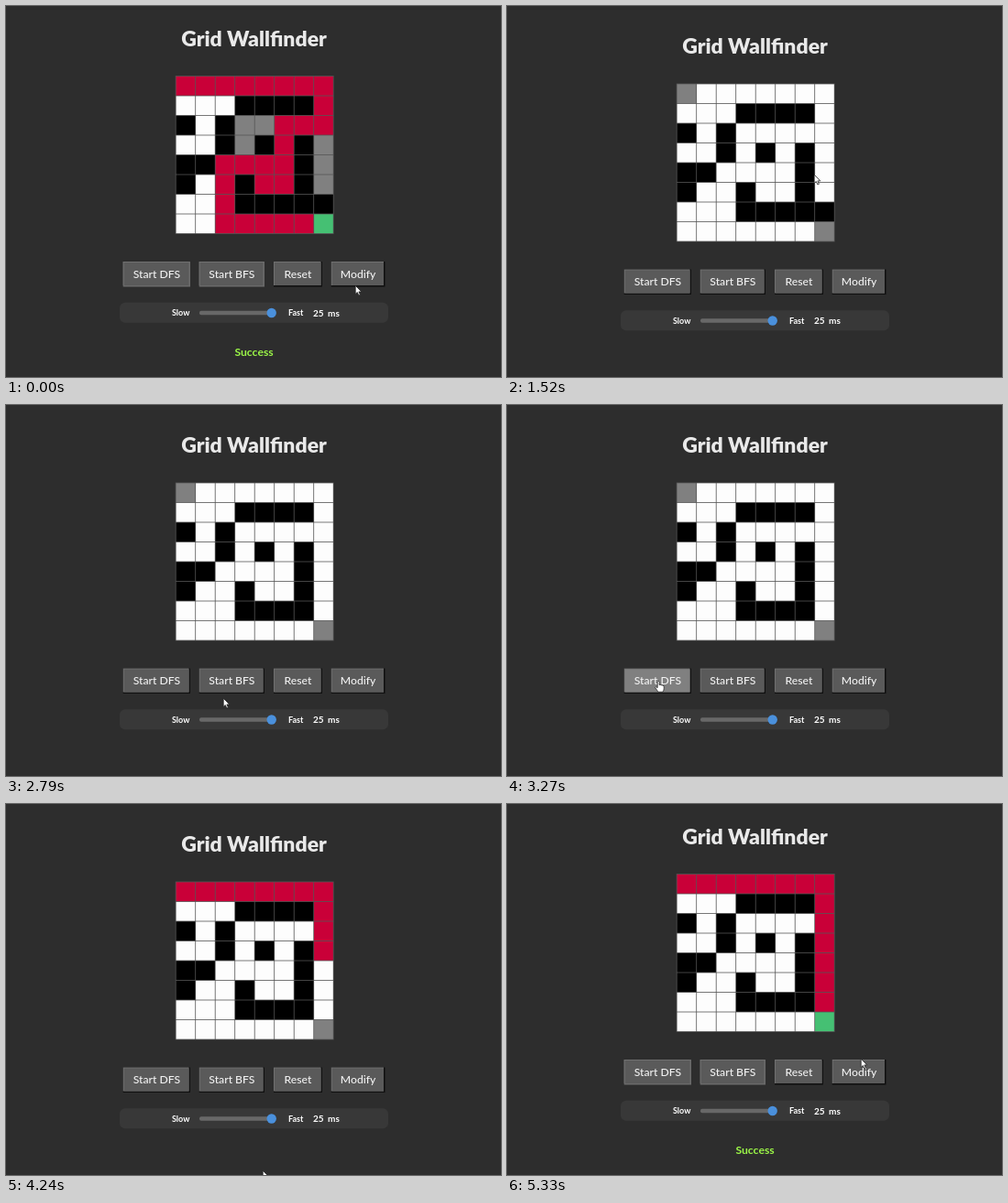
These frames come from a looping animation (540x405 px, 5.36 s). An HTML page with a canvas:

```html
<!DOCTYPE html>
<html lang="en">
<head>
<meta charset="utf-8">
<title>Grid Wallfinder</title>
<style>
  html, body { margin: 0; width: 100%; height: 100%; overflow: hidden; background: #2d2d2d; }
  canvas { display: block; width: 540px; height: 405px; }
</style>
</head>
<body>
<canvas id="stage" width="540" height="405"></canvas>
<script>
const ctx = document.getElementById('stage').getContext('2d');
const LOOP = 5360;
const CLEAR = 580, TOGGLE = 1950, SEARCH = 3376, STEP = 82;
const DONE = SEARCH + 14 * STEP;
const GRID = { x: 185.2, y: 85, size: 21.5, n: 8, line: 0.8 };

const COLORS = {
  '.': '#fdfdfd', '#': '#000', r: '#c90038', g: '#808080', e: '#45c073'
};

const MAZE = [
  'g.......',
  '...####.',
  '#.#.....',
  '..#.#.#.',
  '##....#.',
  '#..#..#.',
  '...#####',
  '.......g'
];

const SOLVED = [
  'rrrrrrrr',
  '...####r',
  '#.#ggrrr',
  '..#g#r#g',
  '##rrrr#g',
  '#.r#rr#g',
  '..r#####',
  '..rrrrre'
];

const BUTTONS = [
  { label: 'Start DFS', x: 127.7, w: 73.3, search: true },
  { label: 'Start BFS', x: 210.7, w: 71.3, search: true },
  { label: 'Reset', x: 292, w: 53 },
  { label: 'Modify', x: 354.7, w: 58.8 }
];
const BUTTON_Y = 287.5, BUTTON_H = 27.5;

// Pointer path: time, x, y
const PATH = [
  [0, 382, 306], [30, 382, 306], [180, 391, 293], [800, 391, 293],
  [1180, 362, 238], [1520, 336, 185], [1820, 346, 224], [2100, 346, 226],
  [2790, 238, 321], [3080, 166, 302], [3360, 166, 302], [3580, 242, 400],
  [3680, 254, 412], [4120, 278, 412], [4240, 281, 401], [4360, 288, 412],
  [4930, 374, 412], [5180, 388, 300], [5330, 387, 279], [LOOP, 387, 279]
];

function pointerAt(t) {
  let i = 0;
  while (i < PATH.length - 2 && t >= PATH[i + 1][0]) i++;
  const [t0, x0, y0] = PATH[i], [t1, x1, y1] = PATH[i + 1];
  const p = Math.min(1, (t - t0) / (t1 - t0));
  const k = p * p * (3 - 2 * p);
  return { x: x0 + (x1 - x0) * k, y: y0 + (y1 - y0) * k };
}

function cellAt(t, row, col) {
  if (t < CLEAR) return SOLVED[row][col];
  const order = row === 0 ? col : col === 7 ? 7 + row : Infinity;
  if (t >= SEARCH + order * STEP) return order === 14 ? 'e' : 'r';
  if (row === 6 && col === 7 && t >= TOGGLE) return '.';
  return MAZE[row][col];
}

function rect(x, y, w, h, color) {
  ctx.fillStyle = color;
  ctx.fillRect(x, y, w, h);
}

function pill(x, y, w, h, r, color) {
  ctx.fillStyle = color;
  ctx.beginPath();
  ctx.roundRect(x, y, w, h, r);
  ctx.fill();
}

function text(str, x, y, font, color = '#f2f2f2', align = 'center') {
  ctx.font = font + ' Lato, "Open Sans", sans-serif';
  ctx.textAlign = align;
  ctx.textBaseline = 'alphabetic';
  ctx.fillStyle = color;
  ctx.fillText(str, x, y);
}

function drawGrid(t) {
  const { x, y, size, n, line } = GRID;
  const half = line / 2;
  rect(x - half, y - half, n * size + line, n * size + line, '#555');
  for (let row = 0; row < n; row++) {
    for (let col = 0; col < n; col++) {
      rect(x + col * size + half, y + row * size + half, size - line, size - line,
        COLORS[cellAt(t, row, col)]);
    }
  }
}

function isOver(b, x, y) {
  return x >= b.x && x < b.x + b.w && y > BUTTON_Y && y < BUTTON_Y + BUTTON_H - 1;
}

function drawButton(b, hover, done) {
  const soft = b.search && done;
  rect(b.x, BUTTON_Y, b.w, BUTTON_H, soft ? '#6a6a6a' : '#101010');
  rect(b.x, BUTTON_Y, b.w - 1.5, BUTTON_H - 1.5, '#707070');
  rect(b.x + 1, BUTTON_Y + 1, b.w - 2.5, BUTTON_H - 2.5, hover ? '#808080' : '#5a5a5a');
  text(b.label, b.x + b.w / 2, BUTTON_Y + 17.6, '500 12.2px');
}

function drawSlider() {
  pill(124, 332.3, 293, 22, 6, '#383838');
  text('Slow', 181, 346.7, 'bold 9px', '#fff', 'left');
  pill(211, 341.2, 80, 4.5, 2, '#686868');
  ctx.fillStyle = '#4a90dc';
  ctx.beginPath();
  ctx.arc(289.7, 343.5, 5.2, 0, Math.PI * 2);
  ctx.fill();
  text('Fast', 308, 346.7, 'bold 9px', '#fff', 'left');
  text('25', 335, 347.2, 'bold 10px', '#fff', 'left');
  text('ms', 351, 347.2, 'bold 10px', '#fff', 'left');
}

function drawPointer(x, y, hand) {
  ctx.save();
  ctx.translate(x - 0.8, y - 0.8);
  ctx.fillStyle = '#fff';
  ctx.strokeStyle = '#222';
  ctx.lineWidth = 0.8;
  ctx.lineJoin = 'round';
  const shape = new Path2D(hand
    ? 'M-1 1Q0-1 1 1V4.5Q2 3.5 3 4.7Q4 3.9 4.8 5.2Q6 4.7 6 6.2V8.5Q6 10 4.8 12H-.5Q-1 10.5-3.6 7.4Q-3.4 5.8-1 7.4Z'
    : 'M0 0V9.2L2.1 7.3L3.7 10.8L5.2 10.1L3.7 6.7H6.6Z');
  ctx.fill(shape);
  ctx.stroke(shape);
  ctx.restore();
}

function draw(t) {
  const done = t < CLEAR || t >= DONE;
  const shift = done ? -8.5 : 0;
  const pointer = pointerAt(t);
  let hand = false;

  rect(0, 0, 540, 405, '#2d2d2d');
  ctx.save();
  ctx.translate(0, shift);
  text('Grid Wallfinder', 270.5, 52, '900 23px', '#e9e9e9');
  drawGrid(t);
  for (const b of BUTTONS) {
    const hover = isOver(b, pointer.x, pointer.y - shift);
    hand = hand || hover;
    drawButton(b, hover, done);
  }
  drawSlider();
  ctx.restore();

  if (done) text('Success', 270.5, 382, 'bold 12.2px', '#9cf748');
  drawPointer(pointer.x, pointer.y, hand);
}

const start = performance.now();
function tick() {
  draw((performance.now() - start) % LOOP);
  requestAnimationFrame(tick);
}
tick();
</script>
</body>
</html>
```
